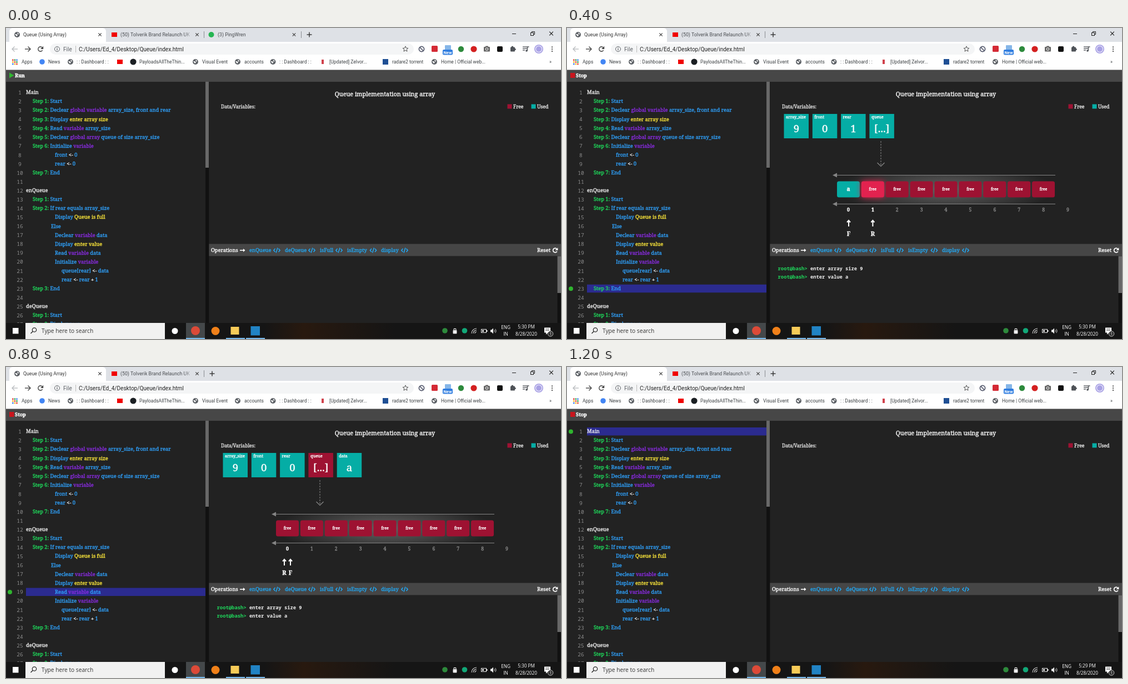
Animation, 999 px wide and 561 px high, one loop 1.4 s. Source, as an HTML page with a canvas:

```html
<!DOCTYPE html>
<html lang="en">
<head>
<meta charset="utf-8">
<title>Queue (Using Array)</title>
<style>
html, body { margin: 0; width: 100%; height: 100%; overflow: hidden; background: #222; }
canvas { display: block; }
</style>
</head>
<body>
<canvas id="stage" width="999" height="561"></canvas>
<script>
const ctx = document.getElementById('stage').getContext('2d');
const SLAB = '"Noto Serif", serif', UI = 'Roboto, sans-serif',
      SYS = '"Open Sans", sans-serif', MONO = '"Noto Sans Mono", monospace';
const PANEL = '#222', RED = '#9e1232', TEAL = '#05ada5', BLUE = '#2fa0fa', GREY = '#5f6368';
const INK = { '#': '#1fdc5c', '~': BLUE, '^': '#8a2be2', '*': '#ffe93b', '=': '#f0f0f0' };

// each mark sets the colour of the run that follows it
const code = [
  [36, '=Main'],
  [48, '#Step 1: ~Start'],
  [48, '#Step 2: ~Declear ^global variable ~array_size, front and rear'],
  [48, '#Step 3: ~Display *enter array size'],
  [48, '#Step 4: ~Read ^variable ~array_size'],
  [48, '#Step 5: ~Declear ^global array ~queue of size array_size'],
  [48, '#Step 6: ~Initialize ^variable'],
  [88, '~front =<- ~0'],
  [88, '~rear =<- ~0'],
  [48, '#Step 7: ~End'],
  [36, ''],
  [36, '=enQueue'],
  [48, '#Step 1: ~Start'],
  [48, '#Step 2: ~If rear equals array_size'],
  [88, '~Display *Queue is full'],
  [81, '~Else'],
  [88, '~Declear ^variable ~data'],
  [88, '~Display *enter value'],
  [88, '~Read ^variable ~data'],
  [88, '~Initialize ^variable'],
  [100, '~queue[rear] =<- ~data'],
  [100, '~rear =<- ~rear =+ ~1'],
  [48, '#Step 3: ~End'],
  [36, ''],
  [36, '=deQueue'],
  [48, '#Step 1: ~Start'],
  [48, '#Step 2: ~Display rear']
];

const steps = [
  { run: true, tabs: 3, clock: '5:30 PM' },
  { line: 21, vars: [9, 0, 0, '[...]', 'a'], queue: true, filled: true, glow: 0, rear: 0, rearLit: true, log: 2 },
  { line: 23, vars: [9, 0, 1, '[...]'], queue: true, filled: true, glow: 1, rear: 1, log: 2 },
  { line: 15, warn: true, vars: [9, 0, 0, '[...]'], queue: true, rear: 0, log: 1 },
  { line: 19, vars: [9, 0, 0, '[...]', 'a'], queue: true, rear: 0, log: 2 },
  { line: 3, vars: ['null', 'null', 'null'], clock: '5:29 PM' },
  { line: 1, clock: '5:29 PM' }
];

function rect(x, y, w, h, color, r = 0) {
  ctx.fillStyle = color;
  ctx.beginPath();
  ctx.roundRect(x, y, w, h, r);
  ctx.fill();
}

function disc(x, y, r, color) {
  ctx.fillStyle = color;
  ctx.beginPath();
  ctx.arc(x, y, r, 0, 7);
  ctx.fill();
}

function ring(x, y, r, color, w = 1, from = 0, to = Math.PI * 2) {
  ctx.strokeStyle = color;
  ctx.lineWidth = w;
  ctx.beginPath();
  ctx.arc(x, y, r, from, to);
  ctx.stroke();
}

function trace(pts) {
  ctx.beginPath();
  for (let i = 0; i < pts.length; i += 2) ctx.lineTo(pts[i], pts[i + 1]);
}

function line(color, w, ...pts) {
  ctx.strokeStyle = color;
  ctx.lineWidth = w;
  trace(pts);
  ctx.stroke();
}

function poly(color, ...pts) {
  ctx.fillStyle = color;
  trace(pts);
  ctx.fill();
}

// y is the middle of the capital letters; slab text gets a slightly heavier stem
function text(s, x, y, size, color, font = SLAB, align = 'left', weight = 400) {
  ctx.font = `${weight} ${size}px ${font}`;
  ctx.fillStyle = ctx.strokeStyle = color;
  ctx.textAlign = align;
  ctx.fillText(s, x, y + size * 0.36);
  if (font === SLAB) {
    ctx.lineWidth = 0.35;
    ctx.strokeText(s, x, y + size * 0.36);
  }
  return ctx.measureText(s).width;
}

function glowing(color, blur, draw) {
  ctx.save();
  ctx.shadowColor = color;
  ctx.shadowBlur = blur;
  draw();
  ctx.restore();
}

function globe(x, y) {
  disc(x, y, 5, GREY);
  poly('#fff', x - 4, y - 1, x - 1, y - 1, x + 1, y + 1, x - 1, y + 3);
  poly('#fff', x, y - 4, x + 3, y - 2, x + 2, y, x + 1, y - 1);
}

function cross(x, y, r, color) {
  line(color, 1.2, x - r, y - r, x + r, y + r);
  line(color, 1.2, x + r, y - r, x - r, y + r);
}

function reload(x, y, r, color, w) {
  ring(x, y, r, color, w, 0.5, 5.5);
  poly(color, x + r + 1, y - r - 1, x + r + 1, y, x, y);
}

function tabs(count) {
  rect(0, 0, 999, 25, '#dee1e6');
  rect(6, 0, 174, 30, '#fff', 6);
  globe(20, 12);
  text('Queue (Using Array)', 31, 12, 8.76, '#333', UI);
  cross(169, 12, 2.7, '#444');
  rect(190, 8, 10, 8, '#f00000');
  text('(50) Tolverik Brand Relaunch UK', 206, 12, 8.76, '#4a4d51', UI);
  const fade = ctx.createLinearGradient(320, 0, 336, 0);
  fade.addColorStop(0, '#dee1e600');
  fade.addColorStop(1, '#dee1e6');
  rect(320, 4, 18, 17, fade);
  cross(344, 12, 2.7, '#444');
  rect(356, 6, 1, 12, '#8a8d91');
  let plus = 371;
  if (count === 3) {
    disc(369.5, 12, 5, '#25b552');
    text('(3) PingWren', 381, 12, 8.76, '#4a4d51', UI);
    cross(518.5, 12, 2.7, '#444');
    rect(531, 6, 1, 12, '#8a8d91');
    plus = 546;
  }
  line('#333', 1.4, plus - 4.5, 12, plus + 4.5, 12);
  line('#333', 1.4, plus, 7.5, plus, 16.5);
  line('#222', 1, 911, 10.5, 918, 10.5);
  ctx.strokeRect(944.5, 8.5, 5, 5);
  line('#222', 1, 946.5, 8, 946.5, 6.5, 951.5, 6.5, 951.5, 11.5, 950, 11.5);
  cross(981.5, 10, 3.3, '#222');
}

function toolbar() {
  rect(0, 24.9, 999, 51, '#fff');
  rect(79, 28, 655, 20, '#f4f5f6', 10);
  line('#b5b8bb', 1.3, 21, 38, 11, 38);
  line('#b5b8bb', 1.3, 15.5, 33.5, 11, 38, 15.5, 42.5);
  line('#444', 1.4, 34, 38, 44, 38);
  line('#444', 1.4, 39.5, 33.5, 44, 38, 39.5, 42.5);
  reload(62, 38, 4.2, '#444', 1.4);
  ring(92, 38, 4.5, GREY, 1);
  rect(91.4, 37, 1.2, 3.6, GREY);
  rect(91.4, 35, 1.2, 1.2, GREY);
  text('File', 103, 38, 10, GREY, UI);
  rect(125, 32, 1, 12, '#bbb');
  text('C:/Users/Ed_4/Desktop/Queue/index.html', 131, 38, 10.05, '#222', UI);

  const star = [];
  for (let i = 0; i <= 10; i++) {
    const a = i * Math.PI / 5 - Math.PI / 2, r = i % 2 ? 2.3 : 5.2;
    star.push(719 + r * Math.cos(a), 38 + r * Math.sin(a));
  }
  line('#555', 1, ...star);
  ring(748, 38, 4.6, '#4f5468', 1.7);
  line('#4f5468', 1.6, 745, 35, 751, 41);
  rect(766, 32, 11, 11, '#d42a35', 1.5);
  rect(790, 31, 11, 9, '#86b6e8', 1);
  rect(786, 39, 18, 9.5, '#2f7de0', 2);
  text('New', 795, 43.8, 7.6, '#fff', UI, 'center', 700);
  disc(819, 38, 5.2, '#2d8a3c');
  disc(842, 38, 5.6, '#d32020');
  rect(860, 34, 11, 8.5, '#666', 1);
  rect(863, 32.5, 5, 2, '#666');
  ring(865.5, 38, 2.3, '#fff', 1);
  rect(884, 33, 10, 10, '#111', 2);
  rect(908, 34.5, 8, 8, '#4f5358', 1);
  disc(911.5, 34.2, 1.8, '#4f5358');
  disc(916, 38.5, 1.8, '#4f5358');
  for (let i = 0; i < 3; i++) {
    line('#4f5358', 1.3, 930, 34 + i * 3, i < 2 ? 938 : 934, 34 + i * 3);
    disc(983, 34.3 + i * 3.8, 1.1, '#444');
  }
  line('#4f5358', 1.3, 941.5, 34, 938.5, 34, 938.5, 41);
  disc(937, 41, 1.8, '#4f5358');
  disc(959, 38, 8, '#a9a2e4');
  ring(959, 38, 5.6, '#e9e7fb', 1.3);
}

function bookmarks() {
  const hues = ['#e8453c', '#34a853', '#4285f4', '#f9bb2d'];
  for (let i = 0; i < 9; i++)
    rect(11 + i % 3 * 3.6, 56.5 + (i / 3 | 0) * 3.6, 2.6, 2.6, hues[i % 4]);
  disc(65, 61, 4.8, '#4285f4');
  rect(200, 57, 10, 8, '#f00000');
  disc(229, 61, 5.6, '#1b1f23');
  rect(568, 57, 4, 8, '#d0424c');
  rect(678, 56, 10, 10, '#1f4f94');
  for (const x of [116, 341, 417, 480.5, 771]) globe(x, 61);
  const marks = { 28: 'Apps', 76: 'News', 127: ': : Dashboard : :', 240: 'PayloadsAllTheThin...',
    353: 'Visual Event', 429: 'accounts', 492: ': : Dashboard : :', 582: '[Updated] Zelvor...',
    695: 'radare2 torrent', 783: 'Home | Official web...', 978: '»' };
  for (const x in marks) text(marks[x], +x, 61, 8.5, '#3c4043', UI);
}

function runBar(run) {
  rect(0, 75.4, 999, 21.6, '#474747');
  if (run) poly('#2fb52f', 6, 80.5, 14.5, 85.5, 6, 90.5);
  else rect(6, 81, 8.5, 9, '#c9151d');
  text(run ? 'Run' : 'Stop', 16, 85.5, 8.8, '#fff', SLAB, 'left', 600);
}

function editor(s) {
  rect(0, 97, 359, 435, PANEL);
  rect(359, 97, 6.5, 435, '#111');
  rect(359, 97, 6, 155, '#686868');
  code.forEach(([x, src], i) => {
    const y = 116 + i * 16.08;
    if (s.line === i + 1) {
      rect(36, y - 7, 323, 14.5, s.warn ? '#964c2a' : '#2b2b8f');
      disc(7, y + 0.5, 4, s.warn ? '#a04e2a' : '#2fb52f');
    }
    text(i + 1, 25, y + 0.5, 9.6, '#8c8c8c', MONO, 'center');
    for (const run of src.match(/[#~^*=][^#~^*=]+/g) || [])
      x += text(run.slice(1), x, y, 9.25, INK[run[0]]);
  });
}

function variables(s) {
  const names = ['array_size', 'front', 'rear', 'queue', 'data'];
  s.vars.forEach((v, i) => {
    const x = 390.5 + i * 51.3;
    const empty = v === 'null' || (i === 3 && !s.filled);
    rect(x, 155, 44.5, 44, empty ? RED : TEAL);
    text(names[i], x + 3.5, 160.5, 7.4, '#fff');
    text(v, x + 22.3, 181, 18.5, '#fff', SLAB, 'center');
  });
}

function pointer(x, label, lit) {
  const draw = () => {
    const c = lit ? '#35c5ff' : '#fff';
    line(c, 2, x, 358, x, 347);
    line(c, 2, x - 3, 350.5, x, 347, x + 3, 350.5);
  };
  lit ? glowing('#1a9cff', 8, draw) : draw();
  text(label, x, 371, 10.4, '#fff', SLAB, 'center', 600);
}

function queue(s) {
  const pitch = 43.88, mid = 506.5;
  ctx.setLineDash([3, 2]);
  line('#8a8a8a', 1, 565, 204, 565, 249);
  ctx.setLineDash([]);
  line('#8a8a8a', 1.2, 558.5, 243, 565, 249.5, 571.5, 243);

  ctx.save();
  ctx.translate(682, 291);
  ctx.scale(1, 0.24);
  const haze = ctx.createRadialGradient(0, 0, 0, 0, 0, 196);
  haze.addColorStop(0, '#646464');
  haze.addColorStop(1, '#64646400');
  rect(-198, -108, 396, 216, haze);
  ctx.restore();

  for (const y of [265.5, 317.5]) {
    line('#858585', 1, 484, y, 879, y);
    poly('#858585', 478, y, 486, y - 4, 486, y + 4);
  }
  for (let i = 0; i < 10; i++) {
    const x = mid + i * pitch, used = s.filled && i === 0, lit = s.glow === i;
    const active = i === 0 || i === s.rear;
    text(i, x, 327.5, 8.6, active ? '#fff' : '#8a8a8a', SLAB, 'center', active ? 600 : 400);
    if (i === 9) break;
    const cell = color => rect(x - 20.5, 276.5, 41, 29, color, 3.5);
    if (lit) glowing(used ? '#14b8b8' : '#e0204c', 12, () => cell(used ? '#30b4b5' : '#e2224f'));
    else cell(used ? TEAL : RED);
    text(used ? 'a' : 'free', x, 290.5, used ? 10 : 7.1, '#fff', SLAB, 'center', used ? 600 : 400);
  }
  const shared = s.rear === 0;
  pointer(shared ? 512 : 507, 'F');
  pointer(shared ? 501 : mid + pitch * s.rear, 'R', s.rearLit);
}

function viewer(s) {
  rect(365.5, 97, 633.5, 293, PANEL);
  text('Queue implementation using array', 682, 119, 10.8, '#fff', SLAB, 'center');
  text('Data/Variables:', 387, 141.5, 8.6, '#e0e0e0');
  rect(902.5, 137.5, 8, 8, RED);
  text('Free', 913, 141.5, 8.7, '#e8e8e8');
  rect(945.5, 137.5, 8, 8, TEAL);
  text('Used', 956, 141.5, 8.9, '#e8e8e8');
  if (s.vars) variables(s);
  if (s.queue) queue(s);
}

function operations() {
  rect(365.5, 389.5, 633.5, 22, '#464646');
  text('Operations', 369, 401, 9.25, '#fff');
  line('#fff', 1.6, 421, 401, 429, 401);
  poly('#fff', 427, 398, 430.5, 401, 427, 404);
  const ops = [['enQueue', 438, 487.5], ['deQueue', 502, 550.5], ['isFull', 565, 599.5],
    ['isEmpty', 614, 661], ['display', 675, 717.5]];
  for (const [name, x, icon] of ops) {
    text(name, x, 401, 9.25, '#22a7f2');
    line('#22a7f2', 1.6, icon - 3, 398, icon - 5.6, 401, icon - 3, 404);
    line('#22a7f2', 1.6, icon + 3, 398, icon + 5.6, 401, icon + 3, 404);
    line('#22a7f2', 1.5, icon + 1.4, 396.5, icon - 1.4, 405.5);
  }
  text('Reset', 956, 401, 9.5, '#fff');
  reload(988.5, 401, 3.8, '#fff', 1.8);
}

function terminal(count = 0) {
  rect(365.5, 411.5, 633.5, 120.5, PANEL);
  rect(992.5, 411.5, 6.5, 120.5, '#111');
  rect(992.5, 411.5, 6.5, 66.5, '#686868');
  ['enter array size 9', 'enter value a'].slice(0, count).forEach((s, i) => {
    const y = 434 + i * 14.7;
    text('root@bash>', 379.5, y, 8.9, '#1fd95c', MONO, 'left', 700);
    text(s, 438, y, 8.75, '#f0f0f0', MONO, 'left', 600);
  });
}

function taskbar(clock) {
  rect(0, 532, 999, 29, '#151515');
  const warm = ctx.createLinearGradient(465, 0, 700, 0);
  warm.addColorStop(0, '#151515');
  warm.addColorStop(0.3, '#28190f');
  warm.addColorStop(1, '#151515');
  rect(465, 532, 235, 29, warm);
  rect(12, 541, 10.5, 10.5, '#fff');
  rect(35, 532, 251, 29, '#f1f1f1');
  ring(51, 544.5, 3.7, '#222', 1.2);
  line('#222', 1.3, 48.3, 547.3, 44.5, 551);
  text('Type here to search', 64, 546.5, 10.2, '#333', SYS);
  disc(304, 546.5, 5.5, '#fff');

  rect(324, 532, 34, 29, '#44484a');
  disc(341, 546, 8, '#dc4a38');
  disc(377, 546.5, 7.5, '#f08019');
  rect(404.5, 539, 15, 14, '#f6cb58');
  rect(440.5, 538, 16.5, 16.5, '#2183c4');
  for (const x of [324, 396, 432]) rect(x, 559, 34, 2, '#76b9ed');

  disc(790, 546, 4.8, '#2d8a3c');
  rect(804.5, 545, 7, 6.5, '#eee', 1);
  ring(808, 544.5, 2.2, '#eee', 1.2, Math.PI, 0);
  disc(825.5, 546, 4.8, '#12a878');
  for (let r = 3; r < 11; r += 3) ring(847, 551, r, '#ddd', 1.1, Math.PI, Math.PI * 1.5);
  ctx.strokeStyle = '#eee';
  ctx.lineWidth = 1;
  ctx.strokeRect(855.5, 543.5, 9, 6);
  rect(857, 545, 3, 3, '#eee');
  rect(865, 545, 1.5, 3, '#eee');
  poly('#eee', 872, 544.5, 874, 544.5, 877, 541.5, 877, 551.5, 874, 548.5, 872, 548.5);
  for (const r of [2.5, 5]) ring(877, 546.5, r, '#ddd', 1, -0.8, 0.8);
  text('ENG', 899.5, 540, 8.2, '#fff', SYS, 'center');
  text('IN', 899.5, 552, 8.2, '#fff', SYS, 'center');
  text(clock, 936.5, 539.5, 8.2, '#fff', SYS, 'center');
  text('8/28/2020', 936.5, 552, 8.2, '#fff', SYS, 'center');
  rect(969, 540.5, 11, 9, '#fff');
  poly('#fff', 972, 549, 976, 549, 972, 553);
  for (const y of [543, 545.5]) line('#333', 0.8, 971, y, 978, y);
  disc(980, 551.5, 4.8, '#333');
  ring(980, 551.5, 4.8, '#ddd', 0.8);
  text('1', 980, 551.5, 7, '#fff', SYS, 'center');
}

function frame(now) {
  const s = steps[Math.floor(now % 1400 / 200)];
  editor(s);
  viewer(s);
  operations();
  terminal(s.log);
  tabs(s.tabs);
  toolbar();
  bookmarks();
  runBar(s.run);
  taskbar(s.clock || '5:30 PM');
  requestAnimationFrame(frame);
}
frame(performance.now());
</script>
</body>
</html>
```
